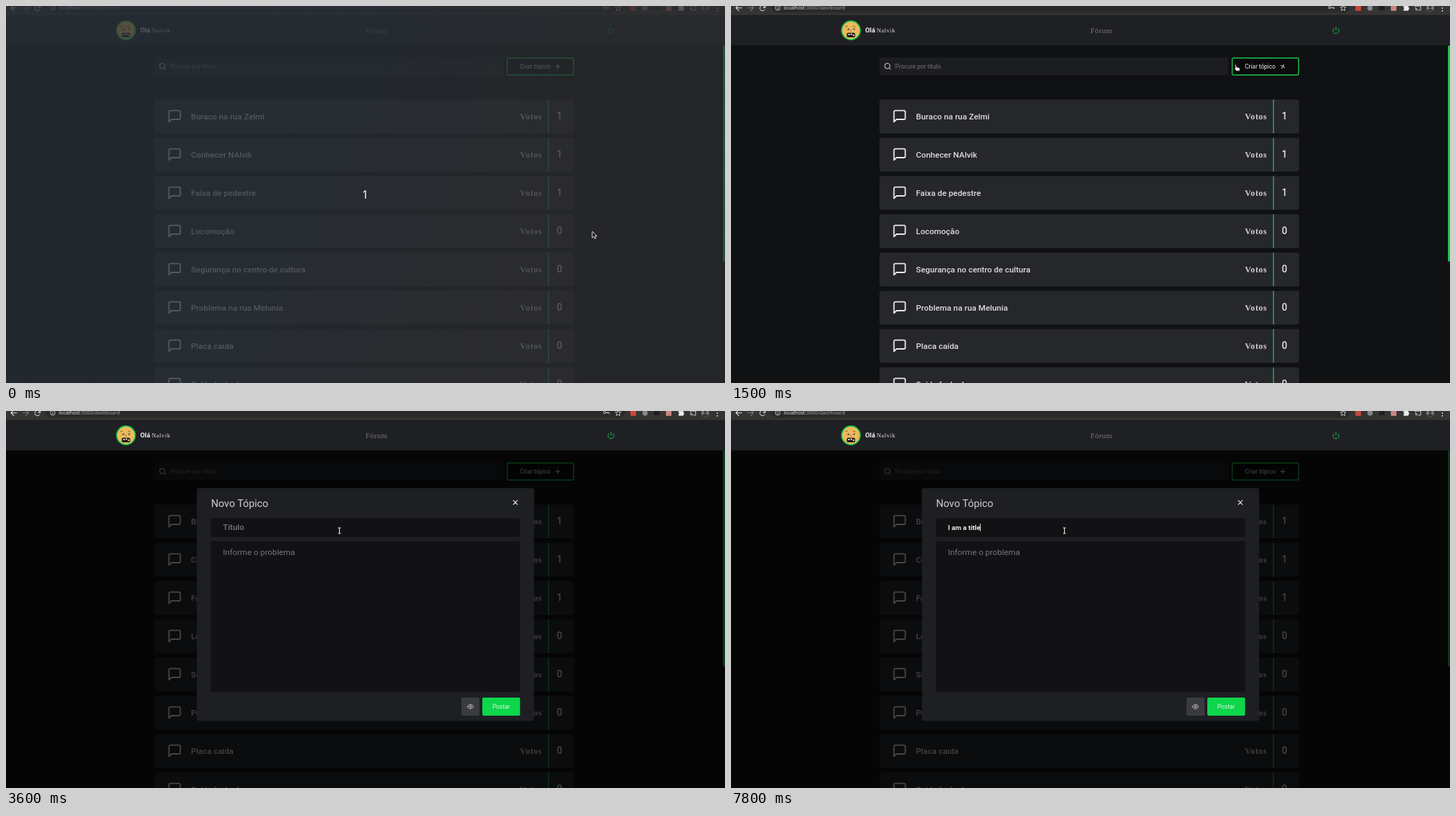
An HTML page for the animation above (8000 ms loop, 1034x542 px).

```html
<!DOCTYPE html>
<html lang="pt">
<head>
<meta charset="utf-8">
<title>Fórum</title>
<style>
  html, body { margin: 0; width: 100%; height: 100%; overflow: hidden; background: #101113; }
  svg { display: block; width: 1034px; height: 542px; }
  text { font-family: Roboto, Arial, sans-serif; white-space: pre; }
  .serif { font-family: "Liberation Serif", Times, serif; }
  .icon { fill: none; stroke: #ececec; stroke-width: 2; stroke-linecap: round; stroke-linejoin: round; }
</style>
</head>
<body>
<svg id="stage" viewBox="0 0 1034 542" xmlns="http://www.w3.org/2000/svg"></svg>
<script>
const LOOP = 8000, STEP = 100;
const GREEN = '#18c64c';

const rect = (x, y, w, h, fill, rx = 0, extra = '') =>
  `<rect x="${x}" y="${y}" width="${w}" height="${h}" rx="${rx}" fill="${fill}" ${extra}/>`;
const text = (x, y, size, fill, str, extra = '') =>
  `<text x="${x}" y="${y}" font-size="${size}" fill="${fill}" ${extra}>${str}</text>`;
const circle = (x, y, r, fill, extra = '') =>
  `<circle cx="${x}" cy="${y}" r="${r}" fill="${fill}" ${extra}/>`;
const icon = (x, y, scale, d, extra = '') =>
  `<path class="icon" transform="translate(${x} ${y}) scale(${scale})" d="${d}" ${extra}/>`;

const BUBBLE = 'M21 15a2 2 0 0 1-2 2H7l-4 4V5a2 2 0 0 1 2-2h14a2 2 0 0 1 2 2z';
const SEARCH = 'M19 11a8 8 0 1 1-16 0a8 8 0 0 1 16 0M21 21l-4.35-4.35';
const POWER = 'M18.36 6.64a9 9 0 1 1-12.73 0M12 2v10';
const EYE = 'M1 12s4-8 11-8 11 8 11 8-4 8-11 8-11-8-11-8zM15 12a3 3 0 1 1-6 0a3 3 0 0 1 6 0';
const PLUS = 'M12 5v14M5 12h14';
const CROSS = 'M18 6L6 18M6 6l12 12';
const ARROW_LEFT = 'M20 12H4M12 4l-8 8 8 8';
const RELOAD = 'M20 5v6h-6M20 11a8 8 0 1 0-1 6';
const STAR = 'M12 2l3 7 7 .6-5.300 4.700 1.600 7.200L12 17.600 5.700 21.500l1.600-7.200L2 9.600 9 9z';
const KEY = 'M10 12a4 4 0 1 1-8 0a4 4 0 0 1 8 0h12v4M17 12v3';
const CAST = 'M3 8V5h18v14h-7M3 12a7 7 0 0 1 7 7M3 16a3 3 0 0 1 3 3';
const PUZZLE = 'M4 7h5a2.500 2.500 0 1 1 5 0h5v5a2.500 2.500 0 1 1 0 5v4H4v-5a2.500 2.500 0 1 0 0-5z';

const topics = [
  ['Buraco na rua Zelmi', 1], ['Conhecer NAlvik', 1], ['Faixa de pedestre', 1],
  ['Locomoção', 0], ['Segurança no centro de cultura', 0],
  ['Problema na rua Melunia', 0], ['Placa caída', 0], ['Saída fechada', 0]
];

function topicRow([title, votes], i) {
  const y = 134.5 + 55 * i;
  return rect(213.5, y, 603.5, 48.5, '#26272b', 3) +
    icon(231.7, y + 13.2, 0.9, BUBBLE) +
    text(266, y + 28, 11.82, '#dededf', title, 'font-weight="500"') +
    text(739, y + 28.5, 12.3, '#cfcfd1', 'Votos', 'class="serif" font-weight="700" letter-spacing=".62"') +
    rect(779.5, y, 1.3, 48.5, GREEN) +
    text(796, y + 28.7, 14, '#e4e4e5', votes, 'font-weight="500" text-anchor="middle"');
}

const browserBar =
  rect(0, 0, 1034, 13, '#353432') +
  rect(57, -12, 834, 21.500, '#2b2a29', 9) +
  icon(5, -3.500, 0.52, ARROW_LEFT) +
  icon(34.500, -3.500, -0.52, ARROW_LEFT, 'stroke-opacity=".4" style="transform-origin:0 0" transform-box="view-box"')
    .replace('scale(-0.52)', 'scale(-.52 .52)') +
  icon(39.500, -3, 0.48, RELOAD) +
  circle(67.2, 2.700, 3.400, 'none', 'stroke="#d0d0d0" stroke-width=".9"') +
  rect(66.7, 2.300, 1, 2.600, '#d0d0d0') + rect(66.7, .7, 1, 1, '#d0d0d0') +
  text(76, 5.200, 7.2, '#e6e6e6', 'localhost<tspan fill="#a3a3a2">:3000/dashboard</tspan>',
    'style="font-family:\'Noto Sans\',sans-serif"') +
  icon(858.500, -2.500, 0.4, KEY, 'id="key"') +
  icon(875.500, -2, 0.4, STAR) +
  rect(898, -1, 8, 8, '#c9463b', 1) +
  circle(919, 3, 3.800, '#85868a') +
  rect(932, 0, 8, 6, '#1e1e1e', 1) +
  rect(949, -1, 8, 8, '#c98480', 1) +
  icon(966, -2.500, 0.42, PUZZLE, 'style="fill:#ececec"') +
  icon(983, -2, 0.42, CAST) +
  circle(1005.500, 3, 5.500, '#777b80') + circle(1005.500, 1.500, 2, '#39332f') +
  `<path d="M1001 6.300q4.500-5 9 0q-4.500 4-9 0z" fill="#39332f"/>` +
  [-1, 3, 7].map(y => circle(1023, y, 1, '#d8d8d8')).join('');

const avatar =
  circle(172.500, 35, 13.300, '#efba5c', `stroke="${GREEN}" stroke-width="1.700"`) +
  circle(168.500, 33.500, 2.300, '#c9a56a') + circle(177, 33, 2.300, '#c9a56a') +
  circle(169, 33.500, .9, '#333') + circle(177, 33.300, .9, '#333') +
  `<path d="M164 30l4-1.500M175 28.500l4 1.500M172.500 34v2.500" stroke="#8b6a35" fill="none"/>` +
  rect(166.500, 38.500, 12, 6.500, '#1c1713', 2) +
  rect(168.500, 40, 2.200, 2, '#f2ead8') + rect(172, 39.500, 2.200, 2, '#f2ead8') + rect(175.300, 41, 2, 2, '#f2ead8');

const header =
  rect(0, 13, 1034, 43.500, '#1f2024') + avatar +
  text(193, 38.400, 9.6, '#f0f0f0', 'Olá', 'font-weight="700"') +
  text(209.500, 38.300, 8.62, '#e2e2e2', 'Nalvik', 'class="serif" letter-spacing=".62"') +
  text(517, 38.700, 11.08, '#77787b', 'Fórum', 'class="serif" letter-spacing=".37"') +
  icon(864.300, 29.300, 0.475, POWER, `style="stroke:${GREEN}"`);

const content =
  rect(213.500, 74, 501.500, 25.700, '#1c1d20', 3) +
  icon(219.500, 81, 0.475, SEARCH) +
  text(236, 90, 8.55, '#737478', 'Procure por título') +
  rect(720.800, 74.700, 95.500, 24.500, '#0b0b0d', 2, `id="border" stroke="${GREEN}" stroke-width="1.400"`) +
  text(739, 90, 8.55, '#f0f0f0', 'Criar tópico') +
  `<g id="plus">${icon(-5.500, -5.500, 0.46, PLUS, 'style="stroke:inherit"')}</g>` +
  topics.map(topicRow).join('') +
  rect(1031, 56.500, 3, 311, GREEN, 1.500);

const modal =
  rect(274.500, 111, 485, 334.500, '#1e1f23', 3) +
  text(295, 138, 14.77, '#cfcfd1', 'Novo Tópico') +
  icon(726.800, 125.800, 0.475, CROSS, 'style="stroke-width:2.600"') +
  rect(294.800, 154.300, 444.500, 26.700, '#121215', 3) +
  rect(294.800, 187, 444.500, 216.700, '#121215', 3) +
  text(312, 170.500, 11.82, '#77787b', 'Título', 'id="hint" font-weight="500"') +
  text(312, 170.700, 9.85, '#f2f2f2', '', 'id="typed" font-weight="700"') +
  rect(312, 162, 1, 11, '#e8e8e8', 0, 'id="caret"') +
  text(312, 206.500, 11.82, '#77787b', 'Informe o problema') +
  rect(655, 412, 26, 26, '#3a3b40', 2) +
  icon(663.300, 420.300, 0.39, EYE) +
  rect(685, 412, 54.300, 26, '#0dd64b', 2) +
  text(712.100, 428.200, 8.7, '#d9f8e1', 'Postar', 'text-anchor="middle"');

const cursors =
  `<path id="arrow" d="M0 0v9.300l2.200-1.900 1.500 3.100 1.700-.8-1.500-3 2.800-.2z" fill="#161616" stroke="#f4f4f4" stroke-width=".9"/>` +
  `<path id="hand" d="M.3 1.200q1-.9 1.500.2l.7 3 4 1.200q1 .4.700 1.600l-.5 2.600h-4.200L-.5 6.700q.2-1.200 1.600-.5z" fill="#fff" stroke="#222" stroke-width=".5"/>` +
  `<path id="beam" d="M-2-4h1.500l.5.500.500-.500H2M0-3.500v7M-2 4h1.500l.5-.5.500.5H2" fill="none" stroke="#ededed" stroke-width="1.100"/>`;

const stage = document.getElementById('stage');
stage.innerHTML =
  `<defs><linearGradient id="veilFill" x2="1" y2=".25">
     <stop offset=".5" stop-color="#272e36"/><stop offset=".8" stop-color="#2a2c2f"/>
   </linearGradient></defs>` +
  rect(0, 0, 1034, 542, '#101113') + content +
  rect(0, 56.500, 1034, 486, '#000', 0, 'id="shade" fill-opacity=".7"') +
  header + browserBar +
  `<g id="modal">${modal}</g>` +
  `<g id="veil">${rect(0, 0, 1034, 542, 'url(#veilFill)', 0, 'fill-opacity=".77"')}` +
  text(516.500, 277, 17, '#f5f5f5', '1', 'text-anchor="middle" style="font-family:\'Noto Sans\',sans-serif"') + `</g>` +
  cursors;

const el = id => document.getElementById(id);
const show = (id, on) => el(id).setAttribute('visibility', on ? 'visible' : 'hidden');

// [time, x, y]
const path = [
  [300, 843, 324], [600, 820, 352], [900, 764, 200], [1200, 722, 60],
  [1500, 724.500, 83.500], [1900, 745, 88], [2200, 760, 86], [2300, 760, 86],
  [2400, 746.500, 99], [2600, 640, 140], [2800, 520, 166], [3000, 479.500, 172]
];
// [time, characters typed]
const keys = [[5100, 1], [5800, 2], [6000, 3], [6200, 5], [6500, 6], [6700, 7],
  [7200, 8], [7300, 9], [7500, 10], [7700, 11], [7800, 12]];
const phrase = 'I am a title';

function pointer(t) {
  const i = path.findIndex(p => p[0] > t);
  if (i === 0) return path[0].slice(1);
  if (i < 0) return path[path.length - 1].slice(1);
  const [a, b] = [path[i - 1], path[i]];
  const k = (t - a[0]) / (b[0] - a[0]);
  return [a[1] + (b[1] - a[1]) * k, a[2] + (b[2] - a[2]) * k];
}

function caretOn(t) {
  if (t < 5100) return (t >= 3100 && t < 3600) || (t >= 4200 && t < 4800);
  return t < 5700 || t >= 5800;
}

function cursorKind(t, x, y) {
  if (t >= 2400) return x > 295 && x < 739 && y > 154 ? 'beam' : 'arrow';
  const onButton = x > 720 && x < 817 && y > 74 && y < 100;
  const onRow = x < 817 && y > 134 && (y - 134.5) % 55 < 48.5;
  return (onButton && t < 2300) || onRow ? 'hand' : 'arrow';
}

function draw(t) {
  show('veil', t < 100);
  show('key', t < 5100);

  const hover = t >= 1400 && t < 2400;
  const angle = hover ? (t - 1350) / 5 : 0;
  const lit = hover && t >= 2000;
  el('plus').setAttribute('transform', `translate(793.500 87) rotate(${angle})`);
  el('plus').setAttribute('stroke', lit ? '#22d65a' : '#ececec');
  el('border').setAttribute('stroke', lit ? '#3fe078' : GREEN);

  const open = t >= 2400;
  show('shade', open);
  el('modal').setAttribute('opacity', open ? Math.min(1, 0.65 + (t - 2400) / 400) : 0);

  const count = keys.filter(k => k[0] <= t).reduce((_, k) => k[1], 0);
  const typed = el('typed');
  typed.textContent = phrase.slice(0, count);
  show('hint', count === 0);
  show('caret', caretOn(t));
  el('caret').setAttribute('x', 312 + (count ? Math.floor(typed.getComputedTextLength()) : 0));

  const [x, y] = pointer(t);
  const kind = cursorKind(t, x, y);
  for (const id of ['arrow', 'hand', 'beam']) {
    show(id, id === kind);
    el(id).setAttribute('transform', `translate(${x} ${y})`);
  }
}

function tick() {
  const t = performance.now() % LOOP;
  draw(Math.floor(t / STEP) * STEP);
  requestAnimationFrame(tick);
}
tick();
</script>
</body>
</html>
```
